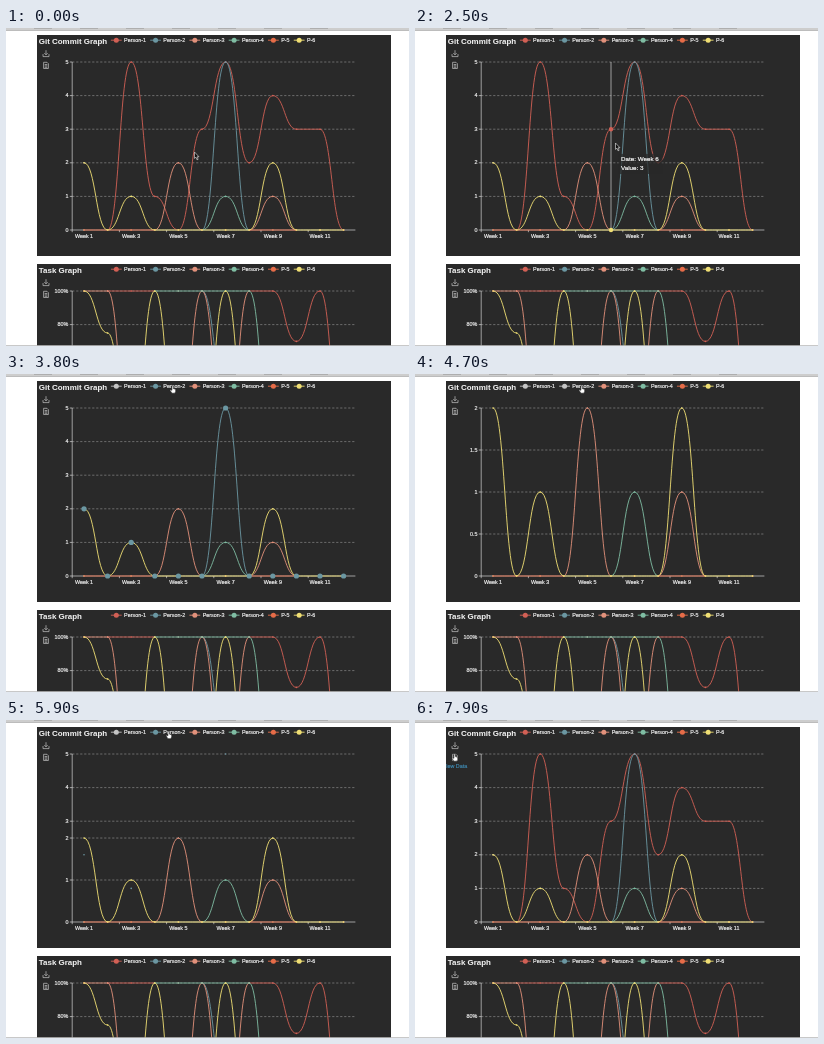
Animation, 403 px wide and 318 px high, one loop 8000 ms. Source, as an HTML page with a canvas:

```html
<!DOCTYPE html>
<html lang="en">
<head>
<meta charset="utf-8">
<title>Commit and task graphs</title>
<style>
html, body { margin: 0; width: 403px; height: 318px; overflow: hidden; background: #fff; }
canvas { display: block; width: 403px; height: 318px; }
</style>
</head>
<body>
<canvas></canvas>
<script>
const canvas = document.querySelector('canvas');
const g = canvas.getContext('2d');
const ratio = window.devicePixelRatio || 1;
canvas.width = 403 * ratio;
canvas.height = 318 * ratio;

const FONT = '"Liberation Sans", Arial, sans-serif';
const SMALL = 5.4, INK = '#eee', OFF = '#c4c4c4';
const COLORS = ['#d26055', '#6b97a2', '#e2917b', '#7fbda3', '#e66c48', '#f0df74'];
const NAMES = ['Person-1', 'Person-2', 'Person-3', 'Person-4', 'P-5', 'P-6'];
const LEFT = 66.2, STEP = 23.6, RIGHT = LEFT + 12 * STEP, BASE = 202, HEIGHT = 168;

// Weekly values: only the weeks that are not zero, or one value over a span
const weeks = peaks => Array.from({ length: 12 }, (_, i) => peaks[i + 1] ?? 0);
const span = (from, to, v) =>
  Object.fromEntries(Array.from({ length: to - from + 1 }, (_, i) => [from + i, v]));

const commits = [
  { 1: 2, 3: 5, 4: 1, 6: 3, 7: 5, 8: 2, 9: 4, ...span(10, 11, 3) },
  { 1: 2, 3: 1, 7: 5 },
  { 5: 2, 9: 1 },
  { 7: 1 },
  {},
  { 1: 2, 3: 1, 9: 2 }
].map(weeks);
const tasks = [
  { ...span(1, 11, 100), 10: 70 },
  { 6: 100, 7: 40 },
  { ...span(1, 2, 100), 6: 100, 8: 100 },
  span(4, 8, 100),
  {},
  { 1: 100, 2: 75, 4: 100, 7: 100 }
].map(weeks);

// Moments in ms
const HIDE_1 = 3320, HIDE_2 = 4370, SHOW_2 = 5766, SHOW_1 = 6650;
const TIP_ON = 2200, TIP_OFF = 2750, ICON = 7780;

// Cursor stops: each is reached at a time after a trip of some length
const STOPS = [
  { at: 0, x: 188.5, y: 124, trip: 0 },
  { at: 1100, x: 128.5, y: 117, trip: 1000 },
  { at: 2200, x: 197, y: 102, trip: 900 },
  { at: 2450, x: 200.5, y: 115, trip: 150 },
  { at: 3150, x: 124, y: 12, trip: 550 },
  { at: 3700, x: 166.5, y: 12, trip: 300 },
  { at: 5420, x: 162.5, y: 11.5, trip: 170 },
  { at: 6450, x: 124, y: 12, trip: 500 },
  { at: 7850, x: 39.5, y: 34, trip: 400 }
];

const clamp = v => Math.max(0, Math.min(1, v));
const mix = (a, b, p) => a + (b - a) * p;
const cubicOut = v => 1 - (1 - clamp(v)) ** 3;
const smooth = v => clamp(v) ** 2 * (3 - 2 * clamp(v));
const within = (t, a, b) => t >= a && t < b;
const pointX = i => LEFT + STEP * (i + 0.5);

function text(s, x, y, size = SMALL, align = 'left', color = INK, weight = '') {
  g.font = `${weight} ${size}px ${FONT}`;
  g.fillStyle = g.strokeStyle = color;
  g.lineWidth = weight ? 0.05 : 0.2;
  g.textAlign = align;
  g.textBaseline = 'middle';
  g.strokeText(s, x, y);
  g.fillText(s, x, y);
}

function line(x1, y1, x2, y2, color = INK, width = 0.6, dash = []) {
  g.strokeStyle = color;
  g.lineWidth = width;
  g.setLineDash(dash);
  g.beginPath();
  g.moveTo(x1, y1);
  g.lineTo(x2, y2);
  g.stroke();
  g.setLineDash([]);
}

function dot(x, y, r, color) {
  g.fillStyle = color;
  g.beginPath();
  g.arc(x, y, r, 0, 7);
  g.fill();
}

function box(x, y, w, h, color) {
  g.fillStyle = color;
  g.fillRect(x, y, w, h);
}

function shape(path, x, y, stroke, width, fill = 'transparent') {
  const p = new Path2D(path);
  g.save();
  g.translate(x, y);
  g.fillStyle = fill;
  g.strokeStyle = stroke;
  g.lineWidth = width;
  g.lineJoin = 'round';
  g.fill(p);
  g.stroke(p);
  g.restore();
}

// Draws a smooth curve; parts that a curve above hides are left out
function curve(values, color, y, above, reveal = 1) {
  g.save();
  g.beginPath();
  g.rect(LEFT, 0, (RIGHT - LEFT) * reveal, 318);
  g.clip();
  g.strokeStyle = color;
  g.lineWidth = 0.9;
  g.beginPath();
  for (let i = 0; i < 11; i++) {
    const a = values[i], b = values[i + 1];
    if (above.some(o => o[i] === a && o[i + 1] === b)) continue;
    const mid = (pointX(i) + pointX(i + 1)) / 2;
    g.moveTo(pointX(i), y(a));
    g.bezierCurveTo(mid, y(a), mid, y(b), pointX(i + 1), y(b));
  }
  g.stroke();
  g.restore();
  values.forEach((v, i) => dot(pointX(i), y(v), 0.8, color));
}

function header(title, top, active) {
  text(title, 32.8, top + 6.6, 7.95, 'left', '#f2f2f2', 'bold');
  let x = 110.3;
  NAMES.forEach((name, i) => {
    const y = top + 5.2, color = active[i] ? COLORS[i] : OFF;
    line(x - 5.4, y, x + 5.4, y, color, 0.9);
    dot(x, y, 2.5, color);
    text(name, x + 7.8, y + 0.2);
    x += g.measureText(name).width + 17.4;
  });
  shape('M-3 .5V3H3V.5M0-3.4V1.2M-1.7-.5L0 1.2 1.7-.5', 40, top + 18.6, '#bbb', 0.75);
  shape('M-2.4-3H1L2.4-1.6V3.2H-2.4ZM-1.3-.8H1.3M-1.3.6H1.3M-1.3 2H1.3', 40, top + 30.3, '#bbb', 0.75);
}

function gridLine(label, y) {
  if (y !== BASE) line(LEFT, y, RIGHT, y, '#999', 0.6, [2.2, 1.8]);
  line(LEFT - 2.4, y, LEFT, y);
  text(label, LEFT - 3.8, y + 0.2, SMALL, 'right');
}

function commitChart(t) {
  const active = NAMES.map(() => true);
  active[0] = !within(t, HIDE_1, SHOW_1);
  active[1] = !within(t, HIDE_2, SHOW_2);
  const hover = [within(t, 3130, HIDE_1) || within(t, 6750, 7500), within(t, 3620, HIDE_2)];
  const reveal = [SHOW_1, SHOW_2].map(s => t < s ? 1 : clamp((t - s) / 1000));

  const wide = HEIGHT / 5, zoomed = HEIGHT / 2;
  const zoom = cubicOut((t - HIDE_2) / 300) - cubicOut((t - SHOW_2) / 300);
  const unit = mix(wide, zoomed, zoom);
  const target = active[1] ? wide : zoomed;
  const moving = v => BASE - v * unit;
  const settled = v => BASE - v * target;

  header('Git Commit Graph', 7, active);
  const tick = active[1] ? 1 : 0.5;
  for (let v = 0; v * target <= HEIGHT; v += tick) {
    const kept = v <= 2 && v % 1 === 0;
    gridLine(v, kept ? moving(v) : settled(v));
  }
  line(LEFT, BASE - HEIGHT, LEFT, BASE);
  line(LEFT, BASE, RIGHT, BASE);
  for (let i = 0; i < 12; i += 2) {
    line(LEFT + i * STEP, BASE, LEFT + i * STEP, BASE + 2.2);
    text('Week ' + (i + 1), pointX(i), 208.2, SMALL, 'center');
  }

  const tip = within(t, TIP_ON, TIP_OFF);
  if (tip) line(pointX(5), BASE - HEIGHT, pointX(5), BASE);
  commits.forEach((values, i) => {
    if (active[i]) curve(values, COLORS[i], i < 2 ? settled : moving, commits.slice(Math.max(i + 1, 2)), reveal[i]);
  });
  commits.forEach((values, i) => {
    if (active[i] && hover[i]) values.forEach((v, w) => dot(pointX(w), settled(v), 2.6, COLORS[i]));
  });
  if (tip) {
    dot(pointX(5), moving(3), 2.2, COLORS[0]);
    dot(pointX(5), BASE, 2.2, COLORS[5]);
  }
}

function taskChart() {
  const y = v => 431 - v * 1.68;
  header('Task Graph', 236, NAMES);
  gridLine('100%', y(100));
  gridLine('80%', y(80));
  line(LEFT, y(100), LEFT, 318);
  tasks.forEach((values, i) => curve(values, COLORS[i], y, tasks.slice(i + 1)));
}

function cursorAt(t) {
  let { x, y } = STOPS[0];
  for (const s of STOPS.slice(1)) {
    const p = smooth((t - s.at + s.trip) / s.trip);
    x = mix(x, s.x, p);
    y = mix(y, s.y, p);
  }
  return [x, y];
}

function pointer(x, y, hand) {
  if (hand) {
    shape('M-.6.2Q.2-.6.9.2V2.6L3.2 3.3V5.4L2.4 7.2H-.6L-2.4 4.4Q-2.3 3.4-.6 4.3Z', x, y, '#222', 0.6, '#fff');
  } else {
    shape('M0 0V6.4L1.4 5.2 2.5 7.8 3.6 7.3 2.5 4.8H4.5Z', x, y, INK, 0.6, '#111');
  }
}

function tooltip(x, y) {
  box(x + 3, y + 11, 44, 20, 'rgba(41,41,41,.75)');
  text('Date: Week 6', x + 5.5, y + 16.3, 6.25, 'left', '#fff');
  text('Value: 3', x + 5.5, y + 25.6, 6.25, 'left', '#fff');
}

function draw(now) {
  const t = now % 8000;
  const [x, y] = cursorAt(t);
  g.setTransform(ratio, 0, 0, ratio, 0, 0);
  box(0, 0, 403, 318, '#fff');
  box(0, 0, 403, 3, '#cdcdcd');
  box(0, 2.2, 403, 0.8, '#b8b8b8');
  for (let i = 0; i < 7; i++) box(28 + i * 46, 0, 18, 0.6, '#999');
  box(31, 7, 354, 221, '#292929');
  box(31, 236, 354, 82, '#292929');

  commitChart(t);
  taskChart();
  box(0, 317.2, 403, 0.8, '#bbb');

  if (t > ICON) {
    text('View Data', 40, 46.3, SMALL, 'center', '#3e86ad');
    box(24, 42, 7, 9, '#fff');
  }
  if (within(t, TIP_ON, TIP_OFF)) tooltip(x, y);
  pointer(x, y, y < 16 || t > ICON);
  requestAnimationFrame(draw);
}
requestAnimationFrame(draw);
</script>
</body>
</html>
```
